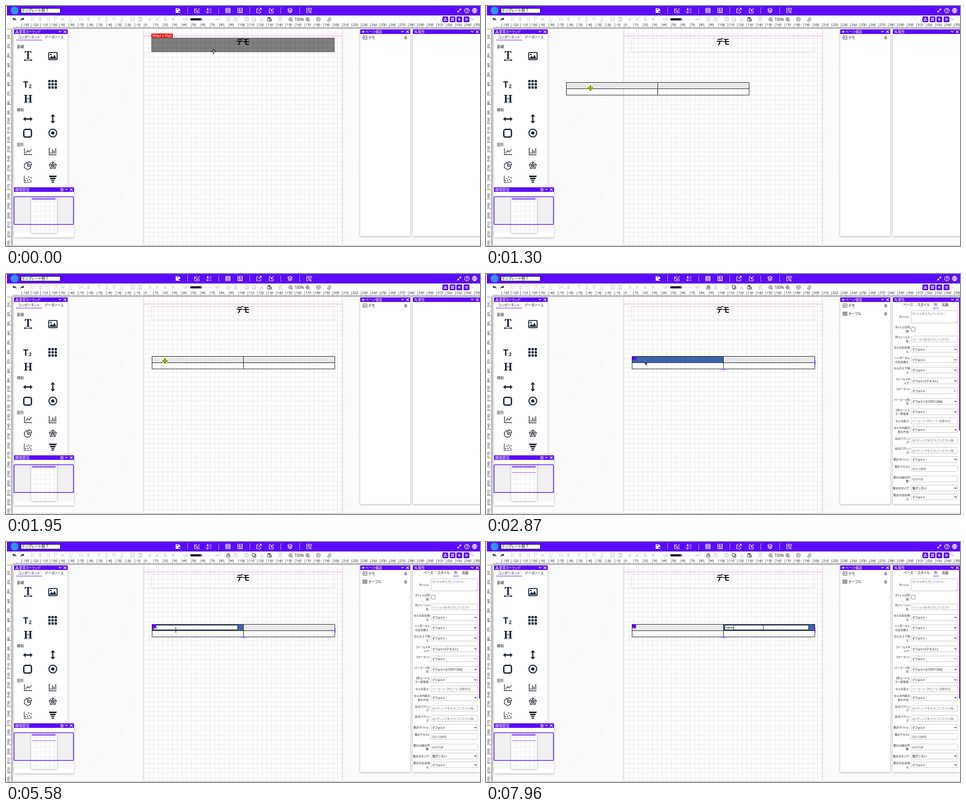
Write an HTML page that moves like this. It is 1053 px wide and 532 px high and loops after 8 s.

```html
<!DOCTYPE html>
<html>
<head>
<meta charset="utf-8">
<title>Template designer</title>
<style>
  html, body { margin: 0; width: 100%; height: 100%; overflow: hidden; background: #fff; }
  svg { display: block; width: 1053px; height: 532px; }
  text { font-family: "Noto Sans", "Noto Sans CJK JP", sans-serif; font-feature-settings: "palt"; white-space: pre; }
  .serif { font-family: "Noto Serif", serif; }
  .panel { filter: drop-shadow(0 1px 2px rgba(0, 0, 0, .3)); }
</style>
</head>
<body>
<svg id="stage" viewBox="0 0 1053 532"></svg>
<script>
const PURPLE = '#5a0bf9', INK = '#1f2937', GRAY = '#c6c6c6', DARK = '#333', BLUE = '#3d63ab';
const MM = 2.095, PAGE_X = 307, PAGE_Y = 51;

const rect = (x, y, w, h, fill, extra = '') =>
  `<rect x="${x}" y="${y}" width="${w}" height="${h}" fill="${fill}" ${extra}/>`;
const frame = (x, y, w, h, color, extra = '') => rect(x, y, w, h, 'none', `stroke="${color}" ${extra}`);
const line = (d, color, width = 1, extra = '') =>
  `<path d="${d}" fill="none" stroke="${color}" stroke-width="${width}" ${extra}/>`;
const icon = (x, y, d, color, width = 1, fill = 'none') =>
  `<path transform="translate(${x} ${y})" d="${d}" fill="${fill}" stroke="${color}" stroke-width="${width}"/>`;
const solid = (x, y, d, color) => icon(x, y, d, 'none', 0, color);
const circle = (x, y, r, fill, extra = '') => `<circle cx="${x}" cy="${y}" r="${r}" fill="${fill}" ${extra}/>`;
const text = (x, y, s, size = 8, fill = '#222', extra = '') =>
  `<text x="${x}" y="${y}" font-size="${size}" fill="${fill}" ${extra}>${s}</text>`;
const group = (id, content, extra = '') => `<g id="${id}" ${extra}>${content}</g>`;
const MIDDLE = 'text-anchor="middle"', END = 'text-anchor="end"', BOLD = 'font-weight="700"';
const ring = r => `M${r} 0A${r} ${r} 0 1 1 ${-r} 0A${r} ${r} 0 1 1 ${r} 0`;

const TRASH = 'M-2.5-2H2.5M-1-3H1M-2-1V3H2V-1M0-.5V2.5';
const LOCK = 'M-3.5-.5H3.5V4H-3.5ZM-2-.5V-2.5A2 2 0 0 1 2-2.5V-.5M0 1V2.5';
const COPY = 'M-4-4H2V2H-4ZM-2 2V4H4V-2H2';
const IMAGE = 'M-4.5-4H4.5V4H-4.5ZM-3 2L-1-2L1 2M-2 1H0M2-1.5H3.5M2 .5H3.5';
const TILES = 'M-3-3H-.8V-.8H-3ZM.8-3H3V-.8H.8ZM-3 .8H-.8V3H-3ZM.8.8H3V3H.8Z';
const BLOCKS = 'M-1-3H1V-1H-1ZM-3 1H-1V3H-3ZM1 1H3V3H1ZM0-1L-2 1M0-1L2 1';
const NODES = 'M0-3V3M-3-1.5L3 1.5M-3 1.5L3-1.5';
const SLIDERS = 'M-3-1.5H3M-3 1.5H3M-1-3V0M1 0V3';

function topBar() {
  const icons = [
    [424, 'M-5-4H1M-5-1H-1M-5 5H5V1M-5-4V5M-2 0L1 2.5L6-5'],
    [451, 'M-5 0L-3-5L-1 0M-4.3-1.5H-1.7M1-4H5.5M1 0H5.5M1 4H5.5M-5 2.5H-2V5H-5Z'],
    [493, 'M-5-5H5V5H-5ZM-5-2H5M-5 1.5H5M-2-5V5M2-5V5'],
    [520, 'M-5-5H5V5H-5ZM-3 2L-1-3L1 2M-2 0H0M2-2H4M2 0H4M-3 3.5H4'],
    [562, 'M-1-4H-5V5H4V1M1-5H5V-1M5-5L-1 1'],
    [590, 'M-1-4H-5V5H4V1M-1-3V1H3M-1 1L5-5'],
    [631, 'M0-5L5-2.5L0 0L-5-2.5ZM-5 0L0 2.5L5 0M-5 2.5L0 5L5 2.5'],
    [673, 'M-1 5H-5V-5H5V0M-3-2.5H3M-3 0H0M4 2.5A2 2 0 1 1 0 2.5A2 2 0 1 1 4 2.5M3.5 4L5.5 6'],
    [1007, 'M4.5-4.5L1-1M1-4V-1H4M-4.5 4.5L-1 1M-4 1H-1V4'],
    [1024, ring(5.2) + 'M-1.7-1.2A1.7 1.7 0 1 1 0 .6V1.6M0 2.5V3.5'],
    [1041, ring(5.2) + 'M-5 0H5M0-5V5M0-5Q-5 0 0 5Q5 0 0-5'],
  ];
  return rect(2, 0, 1051, 21, PURPLE) + circle(19, 10, 8.7, '#2e93f0') +
    rect(33.5, 5.5, 87, 10, '#fff', 'stroke="#222"') + text(35, 13.4, 'テンプレート例 1', 8.2, '#111') +
    solid(382, 10, 'M-5-5H2L5-2V5H-5Z', '#fff') + rect(380, 6, 3, 2, PURPLE) + rect(383, 11, 4, 2.5, PURPLE) +
    icons.map(([x, d]) => icon(x, 10, d, '#fff', 1.2)).join('') +
    line([403, 472, 541, 610, 652].map(x => `M${x}.5 3V17`).join(''), '#c9b3ff');
}

function toolBar() {
  const faded = [
    [60, 'M-4-4V4M-2-2H4M-2 2H2'], [76, 'M0-4V4M-4-2H4M-3 2H3'], [93, 'M4-4V4M2-2H-4M2 2H-2'],
    [110, 'M-4-4H4M-2-2V4M2-2V2'], [126, 'M-4 0H4M-2-4V4M2-3V3'], [143, 'M-4 4H4M-2 2V-4M2 2V-2'],
    [167, 'M-3-4V4M3-4V4M0-2V2'], [183, 'M-4-2H4M-4 2H4M0-4V4'],
    [207, 'M-4-4H4M0 4V-2M-2 0L0-2L2 0'], [224, 'M-3 0L0-3L3 0M0-3V4M-4 4H4'],
    [240, 'M-4-3H4M-4 0H4M0 0V4'], [257, 'M-4 4H4M0-4V2M-2 0L0 2L2 0'],
    [281, 'M-4-4H4V4H-4ZM-4 1H4'], [298, 'M-4-4H4V4H-4ZM-1-4V4M1-4V4'],
    [494, LOCK], [510, LOCK], [535, COPY], [551, COPY],
    [568, 'M-3-4L2 2M3-4L-2 2M-1 3A1.5 1.5 0 1 1-4 3A1.5 1.5 0 1 1-1 3M4 3A1.5 1.5 0 1 1 1 3A1.5 1.5 0 1 1 4 3'],
    [609, 'M-4-3H4M-1-4H1M-3-3V4H3V-3M-1-1V2M1-1V2'],
  ];
  const active = [
    [585, 'M-4-3H3V4H-4ZM-2-4H1V-2H-2ZM0 0H5V4H0Z'],
    [632, ring(3.6) + 'M-2 0H2M2.5 2.5L5 5'], [670, ring(3.6) + 'M-2 0H2M0-2V2M2.5 2.5L5 5'],
    [694, ring(4.2) + 'M-2-1V1M0-1V1M2-1V1'], [718, 'M-3 1L1-4L4-1L1 4H-3ZM-1-1L2 2'],
  ];
  const letters = [[321, 'A⁺'], [337, 'A⁻'], [354, 'B'], [371, 'B']];
  const buttons = [[976, BLOCKS], [992, TILES], [1007, NODES], [1023, SLIDERS]];
  return rect(0, 21, 1053, 17, '#fff') +
    solid(19, 29.5, 'M-4.5-1L-1-4V-2Q4-2 4 3.5Q2.5.5-1 .5V2.5Z', '#222') +
    solid(36, 29.5, 'M4.5-1L1-4V-2Q-4-2-4 3.5Q-2.5.5 1 .5V2.5Z', '#222') +
    faded.map(([x, d]) => icon(x, 29.5, d, GRAY)).join('') +
    letters.map(([x, s]) => text(x, 33, s, 9, '#bbb', MIDDLE)).join('') +
    active.map(([x, d]) => icon(x, 29.5, d, DARK)).join('') +
    group('activeTools', icon(494, 29.5, LOCK, DARK) + icon(551, 29.5, COPY, DARK)) +
    text(398, 32, '-180°', 7, '#bbb', MIDDLE) + text(470, 32, '180°', 7, '#bbb', MIDDLE) +
    rect(434, 29, 24, 1, '#ddd') + rect(409, 27, 27, 5, '#1f1f2e', 'rx="2.5"') + circle(434, 29.5, 1.3, '#fff') +
    text(651.5, 32.6, '100%', 8.5, '#222', MIDDLE) +
    buttons.map(([x, d]) => rect(x - 6.5, 23, 13, 13, PURPLE, 'rx="2"') + icon(x, 29.5, d, '#fff')).join('') +
    icon(1037, 29, 'M-2 0L0-2L2 0L0 2ZM0 2V3', '#c3b3ee');
}

function rulers() {
  let ticks = '', labels = '';
  const reach = i => i % 10 ? i % 5 ? 4.5 : 6.5 : 13;
  for (let i = -139; i < 357; i++) {
    const x = PAGE_X + i * MM;
    ticks += `M${x} 51v${-reach(i)}`;
    if (i % 10 === 0 && i >= -130) labels += text(x + 2, 44.3, i, 7.3);
  }
  for (let i = 0; i < 230; i++) {
    const y = PAGE_Y + i * MM;
    ticks += `M15.5 ${y}h${-reach(i)}`;
  }
  for (let i = 10; i <= 230; i += 10)
    labels += text(0, 0, i, 7.5, '#222', `transform="translate(8 ${PAGE_Y + i * MM}) rotate(-90)"`);
  return rect(0, 38, 1053, 13, '#fff') + rect(0, 38, 16, 494, '#fff') + line(ticks, '#444', .7) + labels;
}

function workArea() {
  const shapes = [[168, 181, ring(5)], [215, 115, 'M-4-3L3 4'], [275, 130, 'M-4-5L5 0L-4 5Z'],
    [258, 198, 'M-3-5L1-6L3 5L-1 6Z'], [203, 240, ring(3)], [190, 268, 'M-3 4L4-4'],
    [762, 56, ring(5)], [775, 130, 'M-4 4L4-4']];
  let pattern = '', grid = '';
  for (const [x, y, d] of shapes)
    for (let k = 0; k < 3; k++) pattern += icon(x, y + 227 * k, d, '#f3f2f2');
  for (let i = 1; i < 42; i++) grid += `M${PAGE_X + i * 5 * MM} 51V530`;
  for (let i = 1; i < 46; i++) grid += `M307 ${PAGE_Y + i * 5 * MM}H746`;
  return rect(0, 51, 1053, 481, '#fcfbfb') + pattern +
    rect(307, 51, 439, 479, '#fff', 'class="panel"') + line(grid, '#e3e3e3', .8) +
    line('M307 66.5H746', '#ff35ac', 1, 'stroke-dasharray="2 1.5"') +
    line('M16 530.5H1053', '#ccc') +
    frame(323.5, 71.5, 406, 30, '#c4c4c4', 'stroke-dasharray="2 1.5"') +
    group('hover', rect(323.5, 71, 406, 30.5, '#000', 'fill-opacity=".5" stroke="#555"') +
      rect(323, 61, 47.5, 9.5, '#f00', 'rx="1"') +
      text(346.7, 68.3, '550pt x 42pt', 7, '#fff', `${MIDDLE} ${BOLD}`)) +
    text(526.5, 84.5, 'デモ', 15.5, '#000', `${MIDDLE} ${BOLD}`);
}

const panel = (x, y, w, h, title, mark, content) =>
  rect(x, y, w, h, '#fff', 'class="panel"') + rect(x, y, w, 10, PURPLE) +
  icon(x + 6.5, y + 5, mark, '#fff', .9) + text(x + 11, y + 7.8, title, 7.6, '#fff') +
  icon(x + w - 17, y + 4.5, 'M-3-1.5L0 1.5L3-1.5', '#fff', 1.2) +
  icon(x + w - 6, y + 5, 'M-3-3L3 3M3-3L-3 3', '#fff', 1.1) + content;

function componentPanel() {
  let cells = '';
  for (let i = 0; i < 9; i++)
    cells += rect(94 + i % 3 * 7, 164 + Math.floor(i / 3) * 7, 5.2, 5.2, INK, 'rx=".8"');
  const dots = [[-5, 3], [-2, -2], [0, 3], [2, -5], [4, 1], [7, -3], [7, 4]];
  const arrow = 'M-10.5 0L-5-5V-1.4H5V-5L10.5 0L5 5V1.4H-5V5Z';
  return panel(18, 52, 119, 350, '要素をドラッグ', BLOCKS,
    text(51, 71.5, 'コンポーネント', 7.6, '#222', MIDDLE) + text(107, 71.5, 'データソース', 7.6, '#222', MIDDLE) +
    rect(22, 75, 58, 1, PURPLE) +
    text(24, 93, '基礎') + text(24, 233, '補助') + text(24, 310, '図形') +
    text(49, 117, 'T', 23, INK, `class="serif" ${MIDDLE} ${BOLD}`) +
    icon(49, 120, 'M-8 0H8M-6-2L-8.5 0L-6 2M6-2L8.5 0L6 2', INK, 1.4) +
    frame(95, 103, 18.5, 16, INK, 'stroke-width="2.2" rx="1.5"') +
    solid(104, 111, 'M-8 6L-3-1L0 3L4-3L8 6Z', INK) + circle(99.5, 107.5, 1.8, INK) +
    text(38, 181, 'T', 20, INK, 'font-weight="800"') + text(50.5, 182, '2', 11, INK, 'font-weight="800"') + cells +
    text(49, 213.5, 'H', 24, INK, `class="serif" ${MIDDLE} font-weight="600"`) +
    solid(48.5, 250.5, arrow, INK) + `<g transform="rotate(90 104 250)">${solid(104, 250, arrow, INK)}</g>` +
    frame(39.5, 273.5, 17, 17, INK, 'stroke-width="3" rx="4"') +
    icon(104, 281.5, ring(8.7), INK, 2.3) + circle(104, 281.5, 3.6, INK) +
    icon(49, 322.5, 'M-8-7V7H9M-5 3L-1-2L2 1L8-5', INK, 1.4) +
    icon(104, 322.5, 'M-8-8V7.5H8M-4 5V1M-.5 5V-5M3 5V-2M6.5 5V-7', INK, 1.6) +
    icon(48.5, 354, 'M-1-7A7.5 7.5 0 1 0 7 1H-1ZM2-9A7 7 0 0 1 8.5-2H2Z', INK, 1.4) +
    icon(104, 353.5, 'M0-8L8-2L5 7H-5L-8-2ZM0-4L4-1L2.5 4H-2.5L-4-1ZM0-8V0L8-2M0 0L5 7M0 0L-5 7M0 0L-8-2', INK, 1.2) +
    icon(48.5, 384, 'M-8-8V7H8', INK, 1.2) + dots.map(([x, y]) => circle(48.5 + x, 384 + y, 1.2, INK)).join('') +
    solid(104, 384, 'M-9-8H9L7.5-4.5H-7.5ZM-6.5-3H6.5L5 .5H-5ZM-4 2H4L3 4.5H-3ZM-2.5 6H2.5V8H-2.5Z', INK));
}

function overviewPanel() {
  let grid = '';
  for (let x = 66; x < 112; x += 10.4) grid += `M${x} 424V503`;
  for (let y = 434; y < 502; y += 10.4) grid += `M56 ${y}H113`;
  return panel(18, 402, 133, 111, '概要図', TILES,
    rect(121, 404, 6.5, 6.5, '#fff', 'opacity=".75"') + line('M122 405.5H126.5M122 407.3H126.5M122 409H126.5', PURPLE, .7) +
    rect(19, 423, 131, 80, '#f7f7f7') + rect(19, 423, 131, 61, '#f0f0f0') +
    rect(56, 424, 57, 79, '#fff', 'class="panel"') + line(grid, '#ececec') +
    rect(57.5, 425.5, 53, 4, '#9a6bfa') + rect(83, 427, 2, 1, '#d9c8ff') +
    group('thumbTable', rect(57.5, 439.5, 53, 1.3, '#9a6bfa')) +
    frame(17.8, 422.7, 132, 61.6, PURPLE, 'stroke-width="1.6" rx="2"'));
}

function structurePanel() {
  const row = (y, label, mark) =>
    icon(797.5, y, mark, '#444', .9) + text(805, y + 3, label, 8) + icon(888, y, TRASH, '#333', .9);
  return panel(787, 52, 111, 458, 'ページ構造', NODES,
    row(70, 'デモ', IMAGE) +
    group('tableRow', row(88, 'テーブル', 'M-4.5-4H4.5V4H-4.5ZM-4.5-1.5H4.5M-4.5 1.3H4.5M-1.5-4V4M1.5-4V4')));
}

function propertyPanel() {
  const any = 'デフォルト';
  const rows = [
    [95, 'タイトル：', 'area', 'タイトルを入力してください'], [122, 'タイトルの同|期：', 'check', ''],
    [144, '列フィールド|名：', 'input', 'フィールド名を入力してください'],
    [167, 'セルの左右揃|え：', 'select', any], [190, 'ヘッダーセル|の左右揃え：', 'select', any],
    [213, 'セルの上下揃|え：', 'select', any], [237, 'フィールドタ|イプ：', 'select', any + '(テキスト)'],
    [259, 'フォーマット|：', 'combo', any], [282.5, 'バーコード形|式：', 'select', any + '(CODE128A)'],
    [305.5, 'QRコードエ|ラー許容率：', 'select', any], [325.5, 'セルの高さ：', 'input', 'バーコード、QRコード、画像有効'],
    [345, 'セルの内容の|表示方法：', 'select', any],
    [368.5, '左のパディン|グ：', 'input', '左パディングを入力してください(最-'],
    [391, '右のパディン|グ：', 'input', '右パディングを入力してください(最-'],
    [411, '集計タイトル：', 'select', any], [431, '集計テキスト|：', 'input', '集計の種類'],
    [454.5, '集計の結合列|数：', 'input', '結合列数'], [474.5, '集計のタイプ：', 'select', '集計しない'],
    [494, '集計の左右揃|え：', 'select', any],
  ];
  const field = ([y, label, kind, value]) => {
    const lines = label.split('|');
    const caption = lines.map((s, i) => text(942, y + 2.3 + (i - (lines.length - 1) / 2) * 8.6, s, 6.2, '#222', END)).join('');
    if (kind === 'check') return caption + frame(944.5, y - 4, 9, 9, '#777', 'rx="2"');
    const tall = kind === 'area', plain = tall || kind === 'input';
    return caption + frame(944.5, y - (tall ? 13.5 : 6.5), 103, tall ? 27 : 13, '#c5c5c5', 'rx="1"') +
      text(947, tall ? y - 5.5 : y + 2.5, value, plain ? 6.2 : 6.8, plain ? '#777' : '#222') +
      (kind === 'select' ? icon(1043, y, 'M-2.2-1.2L0 1.2L2.2-1.2', '#222', 1.2) : '') +
      (kind === 'combo' ? solid(1041.5, y, 'M-2-1H2L0 1.5Z', '#666') : '') +
      (tall ? icon(1045, y + 11, 'M-2 2L2-2M0 2L2 0', '#888', .6) : '');
  };
  const tabs = [[938, 'ベース'], [972, 'スタイル'], [999, '列'], [1020, '高級']];
  return panel(904, 52, 149, 458, '属性', SLIDERS, group('properties',
    tabs.map(([x, s]) => text(x, 71, s, 7.6, '#222', MIDDLE)).join('') + rect(993, 75, 13, 1, PURPLE) +
    rows.map(field).join('') + rect(1051, 62, 2, 285, PURPLE)));
}

function table() {
  const input = (x, id) => rect(x + .5, 184.5, 186, 10, '#fff', 'stroke="#222"') + text(x + 2, 192, '', 6.8, '#000', `id="${id}"`);
  return group('table', rect(.5, .5, 406, 14, '#e8e8e8') + line('M.5.5H406.5V28.5H.5ZM.5 14.5H406.5M203.5.5V28.5', '#111')) +
    group('cell1', rect(325, 183, 202, 13, BLUE)) + group('input1', input(328, 'text1')) +
    group('cell2', rect(528, 183, 202, 13, BLUE)) + group('input2', input(530, 'text2')) +
    group('cellText', text(327, 192, 'id', 6.8, '#000')) +
    rect(0, 185.3, .8, 9, '#000', 'id="caret"') +
    group('grip', rect(325, 182, 8.3, 8.5, PURPLE)) +
    group('handles', rect(522, 210, 10.5, 1.7, PURPLE) + rect(730, 190.5, 1.7, 11, PURPLE));
}

const pointer = group('pointer', circle(0, 0, 6.5, '#f4ee3c', 'id="press" opacity=".85"') +
  group('cross', icon(0, 0, 'M-4.5 0H4.5M0-4.5V4.5', '#222', 1.1) +
    solid(0, 0, 'M0-6L2-3.5H-2ZM0 6L2 3.5H-2ZM-6 0L-3.5-2V2ZM6 0L3.5-2V2Z', '#222') + circle(0, 0, 1.6, '#fff', 'stroke="#222" stroke-width=".8"')) +
  group('arrow', icon(0, 0, 'M0 0V9L2 7.2L3.6 11L5 10.3L3.5 6.8H6Z', '#fff', .5, '#111')) +
  group('beam', icon(2, 2, 'M-2-5H-.6L0-4.4L.6-5H2M-2 5H-.6L0 4.4L.6 5H2M0-4.5V4.5', '#222', .9)));

document.getElementById('stage').innerHTML = workArea() + topBar() + toolBar() + rulers() +
  componentPanel() + overviewPanel() + structurePanel() + propertyPanel() + table() + pointer;

// start, end, from x, from y, to x, to y, downward bow
const MOVES = [
  [280, 850, 461, 101, 111, 171, 0], [1010, 1790, 111, 171, 351, 191, 1],
  [1890, 1950, 351, 191, 353, 193, 0], [3280, 3440, 353, 193, 375, 193, 0],
  [5580, 6100, 375, 193, 607, 190, 39], [6800, 6900, 607, 190, 614, 188, 0],
];
const PRESSES = [[1010, 2300], [2720, 2870], [3590, 3650], [3710, 3780], [6280, 6440], [6590, 6680]];
const CARET_ON = [[3840, 4390], [4750, 5430], [5960, 6440], [6680, 7200], [7580, 8000]];
const ID_KEYS = [4750, 4900], NAME_KEYS = [7580, 7730, 7850, 7960];

const within = (t, spans) => spans.some(([a, b]) => t >= a && t < b);
const typed = (word, keys, t) => word.slice(0, keys.filter(k => t >= k).length);
const el = id => document.getElementById(id);
const show = (id, on) => el(id).setAttribute('visibility', on ? 'visible' : 'hidden');
const place = (id, x, y) => el(id).setAttribute('transform', `translate(${Math.round(x)} ${Math.round(y)})`);

function pointerAt(t) {
  const [a, b, x0, y0, x1, y1, bow] = MOVES.filter(m => t >= m[0]).pop() || MOVES[0];
  const u = Math.min(1, Math.max(0, (t - a) / (b - a))) ** .7;
  const k = u * u * (3 - 2 * u);
  return [x0 + (x1 - x0) * k, y0 + (y1 - y0) * k + bow * 4 * k * (1 - k)];
}

function draw(t) {
  const [x, y] = pointerAt(t);
  place('pointer', x, y);
  const beam = t >= 6900 || t >= 4120 && t < 5660;
  show('cross', t < 2440);
  show('arrow', t >= 2440 && !beam);
  show('beam', beam);
  show('press', within(t, PRESSES));

  // The table trails behind the fast drag and catches up once the pointer slows.
  const lag = t < 1790 ? 55 : 0;
  const [dragX, dragY] = pointerAt(Math.max(1010, Math.min(t, 2300) - lag));
  place('table', dragX - 29, dragY - 11);
  show('table', t >= 1040);

  show('hover', t < 310);
  for (const id of ['thumbTable', 'tableRow', 'grip']) show(id, t >= 2300);
  for (const id of ['properties', 'handles', 'activeTools']) show(id, t >= 2870);
  show('cell1', t >= 2720 && t < 6440);
  show('input1', t >= 3840 && t < 6440);
  show('cellText', t >= 6440);
  show('cell2', t >= 6440);
  show('input2', t >= 6680);

  el('text1').textContent = typed('id', ID_KEYS, t);
  el('text2').textContent = typed('name', NAME_KEYS, t);
  const second = t >= 6680, field = el(second ? 'text2' : 'text1');
  el('caret').setAttribute('x', (second ? 532 : 329.5) + field.getComputedTextLength());
  show('caret', within(t, CARET_ON));
}

const start = performance.now();
function tick() {
  draw((performance.now() - start) % 8000);
  requestAnimationFrame(tick);
}
tick();
</script>
</body>
</html>
```
